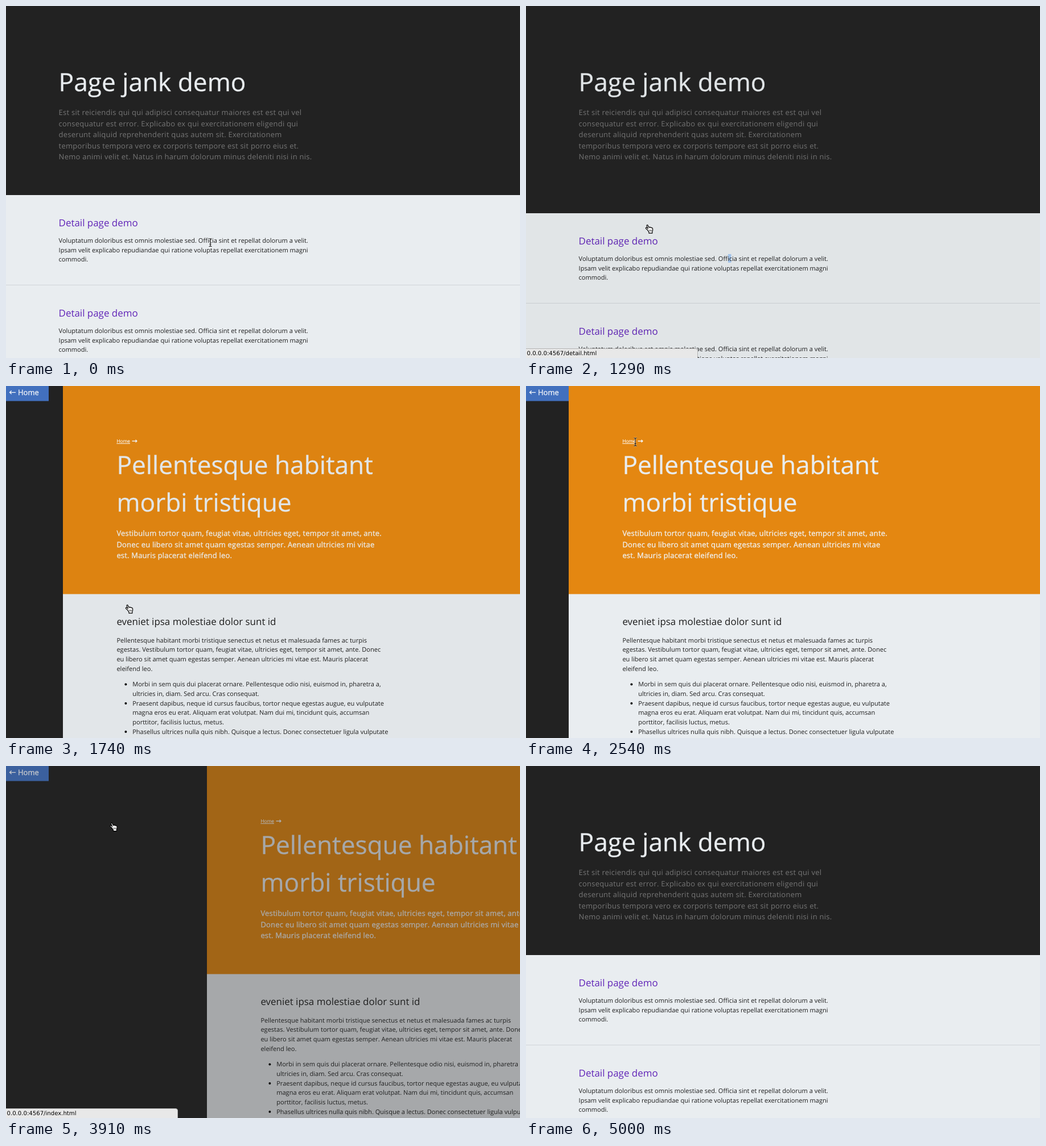
Recreate the animation shown at these times as an HTML page. Size 903x620 px, loop 5500 ms.

```html
<!DOCTYPE html>
<html lang="en">
<head>
<meta charset="utf-8">
<title>Page jank demo</title>
<style>
  html, body { margin: 0; width: 100%; height: 100%; overflow: hidden; background: #222; }
  svg { display: block; }
  text { font-family: "Open Sans", sans-serif; font-size: 11.06px; fill: #1e1e1e; text-rendering: geometricPrecision; }
  .title { font-size: 44.2px; fill: #e9edf0; stroke: #e9edf0; stroke-width: .3px; }
  .lead { font-size: 12.96px; fill: #767676; letter-spacing: .27px; }
  .bright { font-size: 12.96px; fill: #f0f0ee; letter-spacing: .21px; stroke: #f0f0ee; stroke-width: .35px; }
  .heading { font-size: 16.95px; }
  .link { fill: #6125b8; }
  .crumb { font-size: 8.33px; fill: #fff; stroke: #fff; stroke-width: .15px; text-decoration: underline; }
  .button { font-size: 12.96px; fill: #f4f6f9; stroke: #f4f6f9; stroke-width: .3px; }
  .status { font-family: "DejaVu Sans", sans-serif; font-size: 10.15px; fill: #000; }
  .arrow { fill: none; stroke: #f4f6f9; stroke-width: 1.3; }
</style>
</head>
<body>
<svg id="stage" width="903" height="620" viewBox="0 0 903 620"></svg>
<script>
const LOOP = 5500;
const $ = id => document.getElementById(id);

// One text element per line; y is the first baseline.
const lines = (x, y, cls, gap, ...rows) =>
  rows.map((row, i) => `<text x="${x}" y="${y + i * gap}" class="${cls}">${row}</text>`).join('');
const rect = (x, y, w, h, fill, extra = '') =>
  `<rect x="${x}" y="${y}" width="${w}" height="${h}" fill="${fill}" ${extra}/>`;

const BODY = 16.67, LEAD = 19.44, TITLE = 66.67;

const item = y => `<g transform="translate(0 ${y})">` +
  lines(92.6, 54.5, 'heading link', 0, 'Detail page demo') +
  lines(92.6, 84, '', BODY,
    'Voluptatum doloribus est omnis molestiae sed. Officia sint et repellat dolorum a velit.',
    'Ipsam velit explicabo repudiandae qui ratione voluptas repellat exercitationem magni',
    'commodi.') +
  rect(0, 158, 903, 1, '#d0d4d9') + '</g>';

const hero = lines(92.6, 149.5, 'title', 0, 'Page jank demo') +
  lines(92.6, 192.2, 'lead', LEAD,
    'Est sit reiciendis qui qui adipisci consequatur maiores est est qui vel',
    'consequatur est error. Explicabo ex qui exercitationem eligendi qui',
    'deserunt aliquid reprehenderit quas autem sit. Exercitationem',
    'temporibus tempora vero ex corporis tempore est sit porro eius et.',
    'Nemo animi velit et. Natus in harum dolorum minus deleniti nisi in nis.');

const list = rect(0, 333, 903, 320, '#e9edf0') +
  rect(355, 405, 5.5, 15, '#a9cbf3', 'id="selection"') +
  item(333) + item(492);

const bullets = [0, 2, 5].map(n => `<circle cx="110.4" cy="${525.6 + n * BODY}" r="2"/>`).join('');

// Drawn with its left edge at x = 0.
const detail = rect(0, 0, 903, 620, '#e9edf0') + rect(0, 0, 903, 366.5, '#e48711') +
  lines(94.4, 100, 'crumb', 0, 'Home') +
  '<path class="arrow" d="M121.5 97h8.5m-2.5-2.3 2.5 2.3-2.5 2.3"/>' +
  lines(94.4, 154.8, 'title', TITLE, 'Pellentesque habitant', 'morbi tristique') +
  lines(94.4, 264.4, 'bright', LEAD,
    'Vestibulum tortor quam, feugiat vitae, ultricies eget, tempor sit amet, ante.',
    'Donec eu libero sit amet quam egestas semper. Aenean ultricies mi vitae',
    'est. Mauris placerat eleifend leo.') +
  lines(94.4, 421.2, 'heading', 0, 'eveniet ipsa molestiae dolor sunt id') +
  lines(94.4, 451.7, '', BODY,
    'Pellentesque habitant morbi tristique senectus et netus et malesuada fames ac turpis',
    'egestas. Vestibulum tortor quam, feugiat vitae, ultricies eget, tempor sit amet, ante. Donec',
    'eu libero sit amet quam egestas semper. Aenean ultricies mi vitae est. Mauris placerat',
    'eleifend leo.') +
  bullets +
  lines(122.2, 529.3, '', BODY,
    'Morbi in sem quis dui placerat ornare. Pellentesque odio nisi, euismod in, pharetra a,',
    'ultricies in, diam. Sed arcu. Cras consequat.',
    'Praesent dapibus, neque id cursus faucibus, tortor neque egestas augue, eu vulputate',
    'magna eros eu erat. Aliquam erat volutpat. Nam dui mi, tincidunt quis, accumsan',
    'porttitor, facilisis luctus, metus.',
    'Phasellus ultrices nulla quis nibh. Quisque a lectus. Donec consectetuer ligula vulputate');

const button = rect(0, 0, 75, 26.5, '#4270be') +
  '<path class="arrow" d="M17 11.3H6.5m3.2-3-3.2 3 3.2 3"/>' +
  lines(21, 15.8, 'button', 0, 'Home');

const bar = '<path d="M-1 603.5H298q3.5 0 3.5 3.5V621H-1z" fill="#e8e8e8" stroke="#b4b4b4"/>' +
  '<text id="url" x="1.5" y="615.3" class="status"></text>';

const BEAM = 'M-2.5-7Q0-7 0-5.5Q0-7 2.5-7M0-5.5V5.5M-2.5 7Q0 7 0 5.5Q0 7 2.5 7M-1.5 3H1.5';
const cursors = {
  beam: `<path d="${BEAM}" fill="none" stroke="#fff" stroke-opacity=".5" stroke-width="2.4"/>
    <path d="${BEAM}" fill="none" stroke="#111" stroke-width="1.1"/>`,
  hand: `<path d="M4.2 10.2 1.2 7.6C.2 6.4 1.6 5.2 2.7 6L4.4 7.3 2.6 2.7C2.2 1.2 3.9.6 4.6 1.9L6.4 5.6
    C7 4.6 8.4 4.7 8.7 5.7 9.4 5 10.5 5.3 10.8 6.2 11.8 5.8 12.8 6.5 13 7.6 13.4 9.6 13 11.5 12.3 13V15.7H6.5V14z"
    fill="#fff" stroke="#000" stroke-width="1.2"/>
    <path d="M7.3 9.5V12.5M9.1 9.5V12.5M10.9 9.5V12.5" stroke="#111" stroke-width=".7"/>`,
  arrow: `<path d="M.8.8V14.2L3.9 11.3 6 16.2 8.4 15.2 6.3 10.4H10.4z" fill="#000" stroke="#fff" stroke-width="1"/>`
};

$('stage').innerHTML =
  rect(0, 0, 903, 620, '#222') +
  `<g id="hero">${hero}</g><g id="list">${list}</g><g id="detail">${detail}</g>` +
  `<g id="button">${button}</g><g id="bar">${bar}</g>` +
  Object.entries(cursors).map(([k, v]) => `<g id="${k}">${v}</g>`).join('');

// The screen refreshes only at these moments.
const ticks = [0, 170, 320, 410, 490, 580, 670, 750, 840, 930, 1200, 1290, 1440, 1590, 1740, 1890, 2040,
  2190, 2280, 2370, 2450, 2540, 2630, 2720, 2800, 2890, 3730, 3910, 4080, 4260, 4440, 4580, 4730, 4820, 4910, 5000];

const track = [
  [0, 'beam', 359, 416.5], [170, 'beam', 357.5, 416.5], [320, 'beam', 355, 416], [670, 'beam', 236, 401],
  [750, 'hand', 214, 388], [840, 'hand', 209.5, 384.5], [1740, 'hand', 209.5, 384.5],
  [1890, 'beam', 223, 283], [2040, 'beam', 216.5, 155], [2190, 'beam', 207, 125], [2540, 'beam', 192, 98.5],
  [2630, 'hand', 183, 100], [2890, 'hand', 182, 99], [3910, 'hand', 182, 99],
  [4080, 'arrow', 182, 100], [4260, 'arrow', 573, 497], [4440, 'arrow', 596, 527], [4580, 'arrow', 603, 529],
  [4730, 'arrow', 640, 545], [4820, 'arrow', 740, 585], [4910, 'arrow', 824, 603], [5000, 'arrow', 903, 700]
];

const ramp = (t, start, length) => Math.min(1, Math.max(0, (t - start) / length));
const easeIn = (...a) => ramp(...a) ** 3;
const remaining = (...a) => (1 - ramp(...a)) ** 3;
const show = (id, opacity) => $(id).setAttribute('opacity', opacity);
const move = (id, x, y) => $(id).setAttribute('transform', `translate(${x} ${y})`);

function drawCursor(t) {
  const i = track.findLastIndex(k => k[0] <= t);
  const [t0, kind, x0, y0] = track[i];
  const [t1, , x1, y1] = track[i + 1] || [LOOP, kind, x0, y0];
  const p = ramp(t, t0, t1 - t0);
  for (const k in cursors) show(k, k === kind ? 1 : 0);
  move(kind, x0 + (x1 - x0) * p, y0 + (y1 - y0) * p);
}

function draw(t) {
  // How far each page is off stage: 0 in place, 1 gone.
  const home = t < 2500 ? easeIn(t, 1180, 322) : remaining(t, 4040, 265);
  const page = t < 2500 ? remaining(t, 1590, 218) : easeIn(t, 3700, 302);
  show('hero', 1 - home);
  show('list', 1 - home);
  move('list', 0, Math.round(800 * home));
  show('selection', t >= 320 && t < 2500 ? 1 : 0);
  show('detail', 1 - page);
  move('detail', 75 + Math.round(828 * page), 0);
  show('button', t >= 1590 && t < 4080 ? 1 - .6 * page * (t > 2500) : 0);
  show('bar', t < 1590 ? ramp(t, 750, 180) : t < 4080 ? ramp(t, 2630, 260) : 0);
  $('url').textContent = `0.0.0.0:4567/${t < 2000 ? 'detail' : 'index'}.html`;
  drawCursor(t);
}

function frame() {
  const now = performance.now() % LOOP;
  draw(ticks.findLast(t => t <= now));
  requestAnimationFrame(frame);
}
frame();
</script>
</body>
</html>
```
